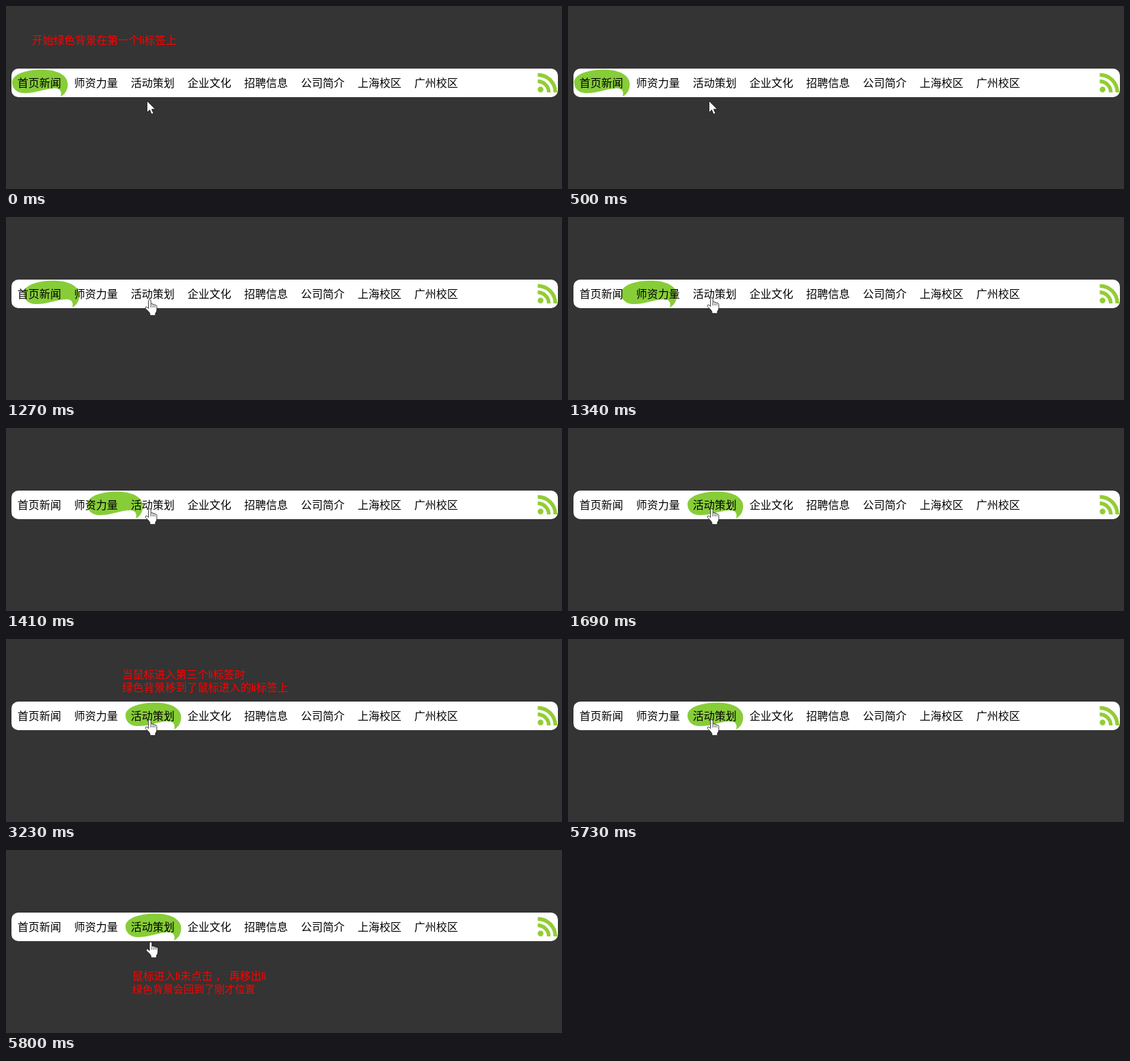
Recreate the animation shown at these times as an HTML page. Size 814 px wide and 269 px high, loop 8 s.

```html
<!DOCTYPE html>
<html lang="zh-CN">
<head>
<meta charset="utf-8">
<style>
html, body { margin: 0; width: 100%; height: 100%; overflow: hidden; background: #333433; }
svg { display: block; font: 16px "Liberation Sans", "Noto Sans CJK SC", "Noto Sans CJK", sans-serif; }
.note { fill: #f00; font-size: 15.75px; }
.green { fill: #87cd38; }
.line { fill: none; stroke: #92cd33; stroke-width: 5.4; }
.cursor { fill: #fff; stroke: #111; stroke-width: .8; }
</style>
</head>
<body>
<svg width="814" height="269" viewBox="0 0 814 269">
  <rect x="8" y="92" width="800" height="42" rx="10" fill="#fff"/>
  <path id="bubble" class="green" d="M9 112C9 100 30 93.4 52 93.4C76 93.4 90.4 102 90.4 115C90.4 124 86 130 80 133C82 127 80 121 72 121C58 121 44 128 28 128C14 128 9 120 9 112Z"/>
  <g id="menu"></g>
  <circle cx="782.6" cy="122.8" r="4.2" fill="#92cd33"/>
  <path class="line" d="M778.5 110.8A16.2 16.2 0 0 1 794.7 127M778.5 101.2A25.8 25.8 0 0 1 804.3 127"/>
  <g class="note">
    <text x="38" y="56">开始绿色背景在第一个li标签上</text>
    <g><text x="170" y="58">当鼠标进入第三个li标签时</text><text x="170" y="77">绿色背景移到了鼠标进入的li标签上</text></g>
    <g><text x="185" y="191">鼠标进入li未点击 ， 再移出li</text><text x="185" y="210" font-size="15">绿色背景会回到了刚才位置</text></g>
  </g>
  <path id="arrow" class="cursor" d="M206.5 139.5V156.5L210.4 152.8L213 159L216 157.8L213.3 151.8H218.5Z"/>
  <path id="hand" class="cursor" d="M4.5 13V2Q4.5 0 6.3 0T8.2 2V7Q8.2 6 9.7 6T11.2 7.5Q11.2 6.7 12.5 6.9T14 8.5Q14 7.6 15.4 8T16.8 10V15Q16.8 18 14.8 20V23.3H6.8V21Q6 18 2.6 15.5T.3 11.3Q1.4 9 4.5 13ZM8.2 7.5V11.5M11.2 8V11.5M14 9V11.5"/>
</svg>
<script>
const $ = id => document.getElementById(id);
const notes = document.querySelector('.note').children;
const LOOP = 8000, STEP = 70, ENTER = 1270, LEAVE = 5800, TRAVEL = 166;

$('menu').innerHTML = '首页新闻 师资力量 活动策划 企业文化 招聘信息 公司简介 上海校区 广州校区'
  .split(' ').map((label, i) => `<text x="${16.7 + 83 * i}" y="119">${label}</text>`).join('');

const show = (el, on) => el.setAttribute('visibility', on ? 'visible' : 'hidden');
const move = (el, x, y) => el.setAttribute('transform', `translate(${x} ${y})`);

// Each 15 ms tick covers a tenth of the remaining distance, rounded up.
function bubbleX(t) {
  const step = Math.floor((t - ENTER) / STEP);
  if (step < 0) return 0;
  if (step >= 6) return TRAVEL;
  let x = 0;
  for (let tick = 1 + Math.floor(step * STEP / 15); tick > 0; tick--) x += Math.ceil((TRAVEL - x) / 10);
  return x;
}

function draw(now) {
  const t = now % LOOP;
  const inside = t >= ENTER, left = t >= LEAVE;
  move($('bubble'), bubbleX(t), 0);
  show(notes[0], t < 500);
  show(notes[1], t >= 3230 && t < 5730);
  show(notes[2], left);
  show($('arrow'), !inside);
  show($('hand'), inside);
  if (left) move($('hand'), 205.5, 135);
  else move($('hand'), 204, t < ENTER + STEP ? 121.5 : 118.5);
}

const start = performance.now();
function frame() {
  draw(performance.now() - start);
  requestAnimationFrame(frame);
}
frame();
</script>
</body>
</html>
```
